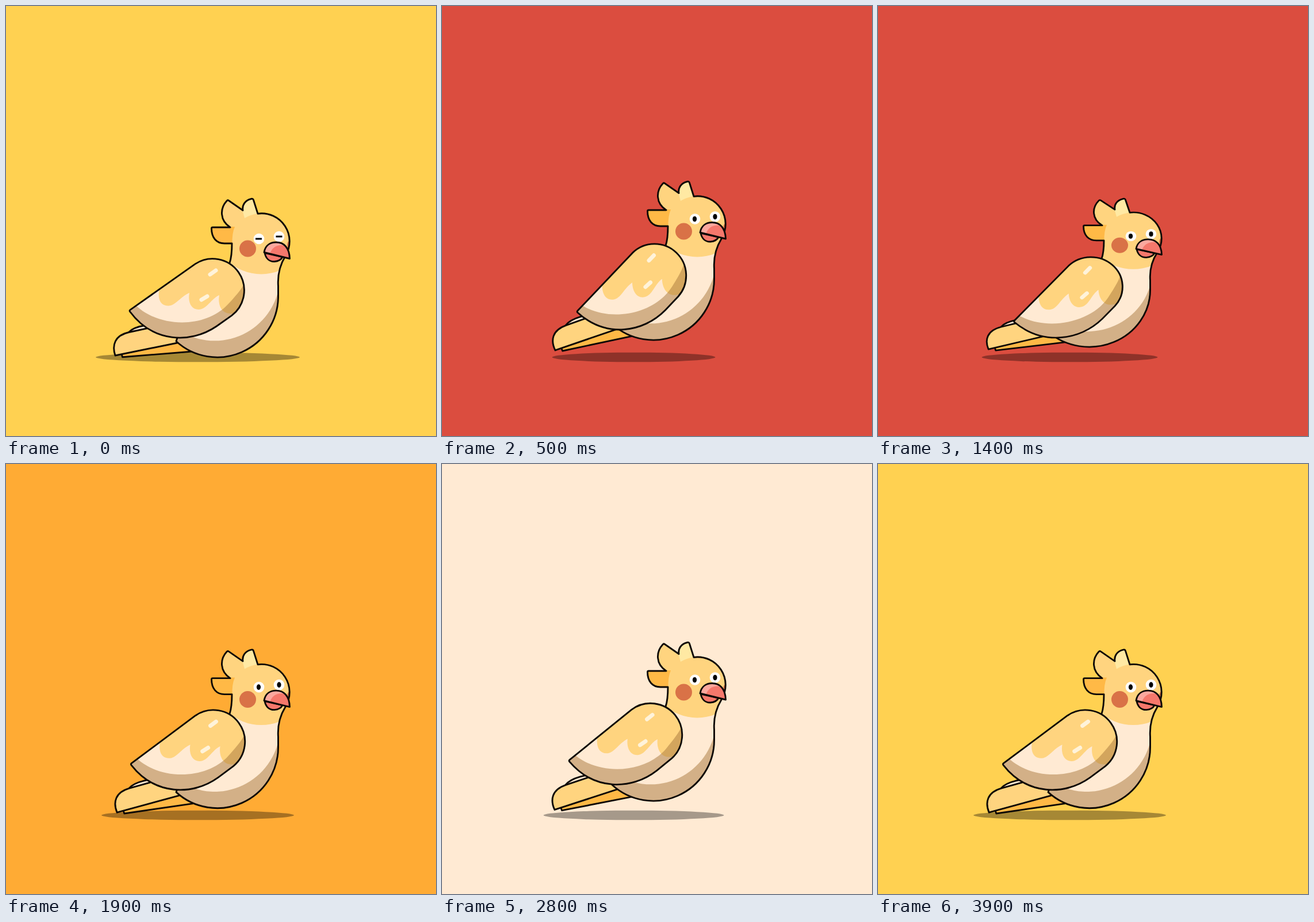
These frames come from a looping animation (748 by 748 pixels, 4000 ms). An HTML page:

```html
<!DOCTYPE html>
<html lang="en">
<head>
<meta charset="utf-8">
<title>Hopping bird</title>
<style>
  html, body { margin: 0; width: 100%; height: 100%; overflow: hidden; }
  svg { display: block; width: 100%; height: 100%; }
  .line { stroke: #0d0906; stroke-width: 2.9; stroke-linejoin: round; stroke-linecap: round; }
  .cream { fill: #ffead3; }
  .yellow { fill: #ffd47f; }
  .orange { fill: #ffb946; }
  .light { fill: #ffe9a3; }
  .cheek { fill: #d97247; }
  .pink { fill: #fba89e; }
  .coral { fill: #f5786c; }
  .shade { fill: #a7783c; opacity: .5; }
  .glint { stroke: #fff3da; stroke-width: 7; stroke-linecap: round; }
</style>
</head>
<body>
<svg id="stage" viewBox="0 0 748 748">
  <defs>
    <path id="bodyShape" d="M330 480L296 583.300A106 106 0 0 0 473.500 505V487C472 465 478 448 486 435
      A48.700 48.700 0 0 0 438 361.200L430.500 337.500Q429.500 334.500 426.500 335.500C416 338 410.500 346 412 355.500
      L387.500 338.500Q385.500 337 384 339C372 352 371.500 373 390 385H359.500Q357.500 385 357.500 387
      C357.500 403 366 413 380 413H393C393 430 392 438 389 447Z"/>
    <path id="wingShape" d="M216 528.600L329.300 448.600A55 55 0 0 1 392.700 538.400L366 557.300
      C320 588.500 255 585 215.500 531.500Q214.500 529.700 216 528.600Z"/>
    <path id="beakShape" d="M449 428.500C451 416 460 411 470 411C483 411 493 420 493.500 439.500Z"/>
    <clipPath id="bodyClip"><use href="#bodyShape"/></clipPath>
    <clipPath id="wingClip"><use href="#wingShape"/></clipPath>
  </defs>

  <ellipse id="shadow" cx="333.5" cy="611" ry="8.3" opacity=".35"/>

  <g id="bird">
    <g id="tail" class="line">
      <path class="cream" d="M214 567Q222 559 240 556L262 553 250 569Z"/>
      <path class="orange" d="M201 605L202.500 610.700 330 600.500V575Z"/>
      <path class="yellow" d="M190 608C184 590 189 573 214 567.500L300 549 330 579.500Z"/>
    </g>

    <g clip-path="url(#bodyClip)">
      <use href="#bodyShape" class="cream"/>
      <path class="shade" d="M476 490L473.500 496A114 114 0 0 1 290 556V640H500V490Z"/>
      <circle class="yellow" cx="444" cy="381.5" r="85"/>
      <path class="orange" d="M350 384H398Q393 395 393.500 415H350Z"/>
      <path class="light" d="M411 354V330H445L438 361Q425 363 415 369Z"/>
      <circle class="cheek" cx="420.5" cy="422" r="14.5"/>
      <ellipse class="cheek" cx="497" cy="416" rx="8" ry="10"/>
    </g>
    <use href="#bodyShape" class="line" fill="none"/>

    <g id="face">
      <g fill="#fff"><circle cx="440" cy="405" r="9.3"/><circle cx="475" cy="401" r="9.3"/></g>
      <g id="open"><ellipse cx="439.5" cy="405" rx="3.6" ry="4.8"/><ellipse cx="475" cy="401" rx="3.6" ry="4.8"/></g>
      <path id="closed" d="M434 405H445M469.500 401H480.500" stroke="#000" stroke-width="3"/>
      <path class="coral line" d="M450 429.500C452 439 458 445 467 444.500C474 444 479 440.500 481 436.500Z"/>
      <use href="#beakShape" class="pink"/>
      <path class="coral" d="M459 431Q464 416 480 416Q490 417 492.500 427L493.500 439.500Z"/>
      <use href="#beakShape" class="line" fill="none"/>
    </g>

    <g id="wing">
      <g clip-path="url(#wingClip)">
        <use href="#wingShape" class="cream"/>
        <path class="yellow" d="M268 488C262 508 268 522 283 521.500C295 521 303 506 319 499
          C316 515 322 528 335 528C349 528 357 509 371 503C368 520 375 535 390 535L430 535V420H330Z"/>
        <path class="shade" d="M222 517C262 560 345 562 385 520S412 482 414 468H430V600H200V517Z"/>
        <path class="glint" d="M355 467L365 460M340 511L350 505"/>
      </g>
      <use href="#wingShape" class="line" fill="none"/>
    </g>
  </g>
</svg>
<script>
  const el = id => document.getElementById(id);
  const backgrounds = ['#ffd151', '#db4d3f', '#ffab34', '#ffead3'];
  const STEP = 100, HOP = 10, GROUND = 683;

  // One hop in ten held poses: settle, gather, leap, fall.
  const lift   = [0, 1, 5, 13, 22.7, 30, 35, 34.5, 25, 12.4];
  const squash = [1, .97, .945, .93, .935, 1, 1, 1, 1, 1];
  const wing   = [0, 1.5, 5, 9.5, 12, 11.3, 9, 6.5, 3.8, 1.5];
  const tail   = [0, 0, .5, 1.5, 2.6, 7.4, 9, 8.6, 6.5, 3.7];
  const shadow = [177.5, 176, 171, 163, 153, 142, 137, 145, 157, 167.5];

  function draw(time) {
    const step = Math.floor((time + 2) / STEP);
    const pose = step % HOP;
    const airborne = pose >= 5;
    const blinking = pose < 2;
    const scale = squash[pose];
    const set = (id, transform) => el(id).setAttribute('transform', transform);

    el('stage').style.background = backgrounds[Math.floor((step + 5) / HOP) % 4];
    el('shadow').setAttribute('rx', shadow[pose]);
    set('bird', `matrix(1 0 0 ${scale} 0 ${GROUND * (1 - scale) - lift[pose]})`);
    set('wing', `rotate(${-wing[pose]} 386 444.5)`);
    set('tail', `rotate(${-tail[pose]} 355 565)`);
    set('face', `translate(0 ${airborne ? -4.5 : 0})`);
    el('open').style.display = blinking ? 'none' : '';
    el('closed').style.display = blinking ? '' : 'none';
  }

  const start = performance.now();
  function tick() {
    draw(performance.now() - start);
    requestAnimationFrame(tick);
  }
  tick();
</script>
</body>
</html>
```
